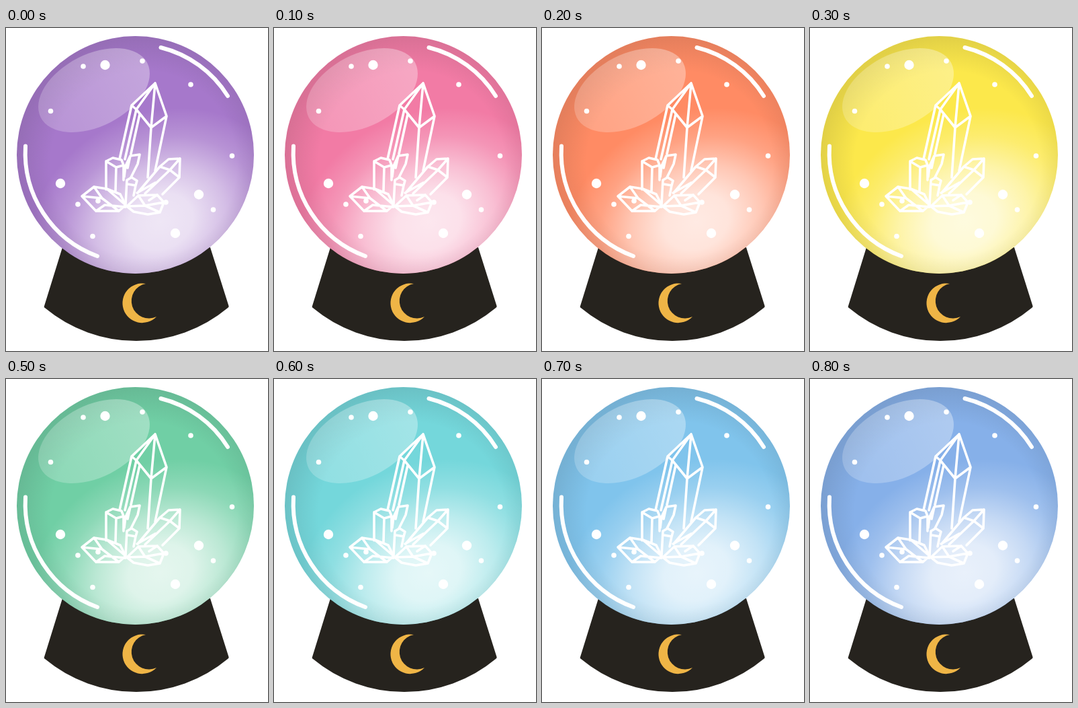
An HTML page that plays this animation: 390x480 px, repeating every 900 ms.

```html
<!DOCTYPE html>
<html lang="en">
<head>
<meta charset="utf-8">
<title>Crystal ball</title>
<style>
  html, body { margin: 0; width: 100%; height: 100%; overflow: hidden; background: #fff; }
  svg { display: block; width: 390px; height: 480px; }
  .line { fill: none; stroke: #fff; stroke-linecap: round; stroke-linejoin: round; }
</style>
</head>
<body>
<svg viewBox="0 0 390 480">
  <defs>
    <clipPath id="ball"><circle cx="192.5" cy="188.5" r="176.5"/></clipPath>
    <radialGradient id="glow">
      <stop offset="0" stop-color="#fff" stop-opacity=".82"/>
      <stop offset=".25" stop-color="#fff" stop-opacity=".77"/>
      <stop offset=".5" stop-color="#fff" stop-opacity=".52"/>
      <stop offset=".75" stop-color="#fff" stop-opacity=".2"/>
      <stop offset="1" stop-color="#fff" stop-opacity="0"/>
    </radialGradient>
    <radialGradient id="rim" gradientUnits="userSpaceOnUse" cx="205" cy="203" r="198">
      <stop offset=".7" stop-color="#222" stop-opacity="0"/>
      <stop offset=".96" stop-color="#222" stop-opacity=".12"/>
    </radialGradient>
    <linearGradient id="shine" x1="0" x2="1">
      <stop offset="0" stop-color="#fff" stop-opacity=".2"/>
      <stop offset="1" stop-color="#fff" stop-opacity=".34"/>
    </linearGradient>
  </defs>

  <path d="M84 326L57 413Q56 415 58 416A213 213 0 0 0 330 416Q332 415 331.500 413L304 326Z" fill="#26231e"/>
  <path d="M208 380A29.300 29.300 0 1 0 224 429A26 26 0 1 1 208 380Z" fill="#efb546"/>

  <g clip-path="url(#ball)">
    <rect id="tint" width="390" height="380"/>
    <ellipse rx="200" ry="162" transform="translate(230 288) rotate(-25)" fill="url(#glow)"/>
    <rect width="390" height="380" fill="url(#rim)"/>
  </g>
  <ellipse rx="89" ry="53.5" transform="translate(131 92.500) rotate(-27)" fill="url(#shine)"/>

  <path class="line" stroke-width="6" d="M230.500 29A163.500 163.500 0 0 1 330 101M29 175.500A163.500 163.500 0 0 0 136 339"/>

  <g class="line" stroke-width="3.6">
    <!-- tall crystal -->
    <path d="M169 195L187 115L222 82L239 131L222 212M222 82L194 121L216 148L239 131M222 82L216 148L211 222M187 115L194 121L177 195M199 128L186 187"/>
    <!-- left column and small shards -->
    <path d="M149 240V198L159 193L172 196L175 204L164 207L149 198M164 207L163 242M175 204V226M176 221L178 205L185 190L199 188L196 202L186 222M185 190L181 208"/>
    <path d="M178 262L180 226L187 222L195 227L193 234L181 232M193 234L190 249"/>
    <!-- right shard -->
    <path d="M196 245L229 206L242 195L259 194L258 222L233 247M229 206L244 211L259 194M244 211L258 222M244 211L207 246M195 245L222 230"/>
    <!-- crystals at the foot -->
    <path d="M178 263L150 239L131 236L113 250L134 272L168 272L178 263M113 250L143 253L131 236M143 253L168 272M134 272L147 263L178 266M150 239L170 247L178 263"/>
    <path d="M180 265L197 249L225 248L235 259L229 274L211 277L190 273ZM180 265L207 264L229 274M197 249L207 264L235 259M225 248L213 256"/>
  </g>
  <g id="sparks" fill="#fff"></g>
</svg>
<script>
  const STEP = 100;
  const tints = ['#a678cb', '#f27ba5', '#ff8b64', '#fce84b', '#a2ca62',
                 '#70cfa5', '#74d7db', '#80c4ec', '#86b0e9'];
  const small = [[115, 57], [203, 49], [275, 84], [66.5, 123.5], [336.5, 190], [107, 262],
                 [129, 309.5], [308.5, 270], [137, 257], [238, 259]];
  const large = [[147.5, 55], [81, 231], [287, 247.5], [252, 305]];

  const dots = (points, r) =>
    points.map(([x, y]) => `<circle cx="${x}" cy="${y}" r="${r}"/>`).join('');
  document.getElementById('sparks').innerHTML = dots(small, 3.8) + dots(large, 7.2);

  const tint = document.getElementById('tint');
  function draw() {
    tint.setAttribute('fill', tints[Math.floor(performance.now() / STEP) % tints.length]);
    requestAnimationFrame(draw);
  }
  draw();
</script>
</body>
</html>
```
